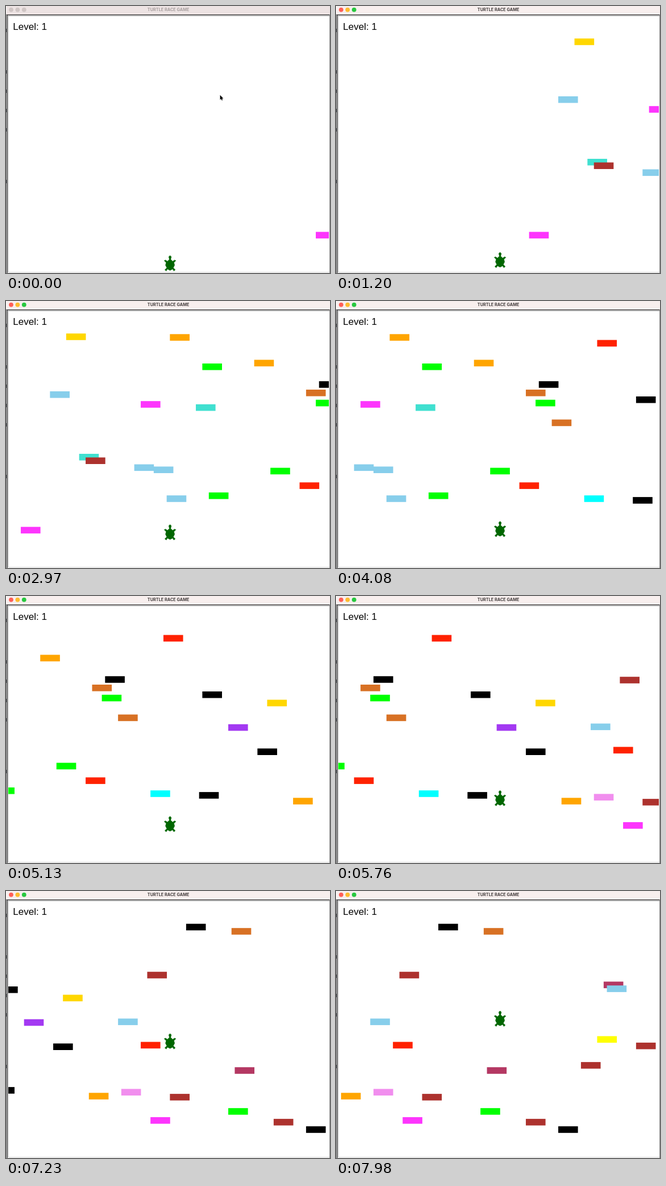
Write an HTML page with a canvas that moves like this. It is 570 px wide and 470 px high and loops after 8000 ms.

```html
<!DOCTYPE html>
<html lang="en">
<head>
<meta charset="utf-8">
<title>Turtle Race Game</title>
<style>
html, body { margin: 0; width: 100%; height: 100%; overflow: hidden; background: #fff; }
canvas { display: block; }
</style>
</head>
<body>
<canvas id="stage" width="570" height="470"></canvas>
<script>
const ctx = document.getElementById('stage').getContext('2d');
const LOOP = 8000, TICK = 30;
const STEP = 5.703;          // ten game units in pixels
const ACTIVE_AT = 420;       // window gains focus
const CURSOR_GONE = 1190;

const COLORS = {
  m: '#fd35fd', s: '#87ceeb', g: '#ffd700', t: '#40e0d0', b: '#ad322e',
  o: '#ffa500', l: '#00ff00', r: '#ff2200', c: '#d87124', k: '#000',
  p: '#a339f2', a: '#00ffff', v: '#f18eee', n: '#b43863', y: '#ffff00'
};

// [colour, game step at which the left edge is at x = 545, top]
const CARS = [
  ['m', 0, 397.6], ['s', 9, 159], ['g', 14, 57.2], ['t', 18, 269], ['b', 20, 275.4],
  ['s', 35, 287.5], ['m', 37, 176.2], ['s', 41, 291.4], ['s', 45, 342.2], ['o', 46, 58.3],
  ['t', 54, 181.8], ['l', 56, 110], ['l', 58, 337], ['o', 72, 103.5], ['l', 77, 293.6],
  ['r', 86, 319.3], ['c', 88, 156], ['l', 91, 173.8], ['k', 92, 141.2], ['c', 96, 208.6],
  ['a', 106, 342.2], ['r', 110, 68.6], ['k', 121, 345.1], ['k', 122, 168], ['p', 130, 225.7],
  ['k', 139, 268.4], ['g', 142, 182.6], ['o', 150, 355.3], ['s', 159, 224.5], ['v', 160, 348.4],
  ['r', 166, 265.6], ['b', 168, 142.2], ['m', 169, 398.1], ['b', 175, 357.1], ['k', 180, 57.7],
  ['l', 193, 382.2], ['c', 194, 65.2], ['n', 195, 310.2], ['b', 207, 401.1], ['k', 217, 414.2],
  ['b', 224, 301.1], ['y', 229, 255.5], ['n', 231, 159.5], ['s', 232, 166.3], ['b', 241, 266.9]
];

// [ms, game steps done]
const PACE = [[0, 0], [2160, 66], [2970, 91], [4080, 125], [5130, 157], [6450, 197], [7980, 244]];

// key presses: [first ms, interval, count]
const KEYS = [[1190, 0, 1], [1655, 90, 7], [3660, 0, 1], [5190, 80, 16], [6480, 100, 15]];

// right half of the turtle, nose to tail
const SHELL = [
  [0, 16], [2, 14], [1, 10], [4, 7], [7, 9], [9, 8], [6, 5],
  [7, 1], [5, -3], [8, -6], [6, -8], [4, -5], [0, -7]
];
const TURTLE = SHELL.concat(SHELL.slice(1, -1).reverse().map(([x, y]) => [-x, y]));
const ARROW = [[0, 0], [0, 9], [2, 7.2], [3.4, 10.2], [4.9, 9.5], [3.6, 6.7], [6.2, 6.4]];

function gameStep(t) {
  const i = Math.max(1, PACE.findIndex(p => p[0] >= t));
  const [t0, s0] = PACE[i - 1], [t1, s1] = PACE[i];
  return Math.floor(s0 + (s1 - s0) * (t - t0) / (t1 - t0) + 1e-6);
}

function turtleSteps(t) {
  return KEYS.reduce((sum, [start, gap, count]) => {
    if (t < start) return sum;
    return sum + (gap ? Math.min(count, Math.floor((t - start) / gap) + 1) : count);
  }, 0);
}

function rect(color, x, y, w, h) {
  ctx.fillStyle = color;
  ctx.fillRect(x, y, w, h);
}

function poly(points, x, y, sx, sy, fill, stroke, width) {
  ctx.beginPath();
  points.forEach(([px, py]) => ctx.lineTo(x + px * sx, y + py * sy));
  ctx.closePath();
  ctx.lineWidth = width;
  ctx.strokeStyle = stroke;
  ctx.stroke();
  ctx.fillStyle = fill;
  ctx.fill();
}

function text(str, x, y, font, color, align) {
  ctx.font = font;
  ctx.fillStyle = color;
  ctx.textAlign = align;
  ctx.fillText(str, x, y);
}

function drawWindow(active) {
  rect('#fff', 0, 0, 570, 470);
  rect('#a9a9ab', 0, 14, 1.5, 456);
  [40, 113, 147, 181, 215, 306].forEach(y => rect('#35383f', 0, y, 1, 6));
  rect(active ? '#f8efee' : '#ede3e3', 1, 0, 569, 15);
  const dots = active ? ['#ff5f57', '#febc2e', '#28c840'] : Array(3).fill('#cfc5c4');
  dots.forEach((color, i) => {
    ctx.fillStyle = color;
    ctx.beginPath();
    ctx.arc(9 + i * 11.4, 6.6, 3.9, 0, Math.PI * 2);
    ctx.fill();
  });
  text('TURTLE RACE GAME', 285.6, 9.2, '700 7.3px Inter, sans-serif',
    active ? '#433d3d' : '#a79e9e', 'center');
  rect('#1c1c1c', 1.5, 15, 568.5, 1.2);
  rect('#1c1c1c', 1.5, 15, 1.2, 455);
  rect('#a0a0a0', 3.6, 17, 565.4, 0.8);
  rect('#a0a0a0', 3.6, 17, 0.8, 452);
  rect('#8a8a8a', 569, 15, 1, 455);
  rect('#d0d0d0', 4, 468.3, 565, 1);
}

function draw(time) {
  const t = Math.floor(time / TICK) * TICK;
  const step = gameStep(t);
  drawWindow(t >= ACTIVE_AT);
  text('Level: 1', 12.2, 42.4, '17.1px "Liberation Sans", Arial, sans-serif', '#000', 'left');

  poly(TURTLE, 288.6, 457.4 - turtleSteps(t) * STEP, 1.14, -1.14, '#006600', '#006600', 0.6);

  ctx.save();
  ctx.beginPath();
  ctx.rect(4, 18, 564, 450);
  ctx.clip();
  CARS.forEach(([color, start, y]) => {
    const x = 545 - (step - start) * STEP;
    if (x < 552 && x > -35) rect(COLORS[color], x, y, 34.6, 11.6);
  });
  ctx.restore();

  if (t < CURSOR_GONE) poly(ARROW, 376.6, 156.8, 0.92, 0.92, '#000', '#fff', 1.4);
}

let origin = null;
function frame(now) {
  if (origin === null) origin = now;
  draw((now - origin) % LOOP);
  requestAnimationFrame(frame);
}
draw(0);
requestAnimationFrame(frame);
</script>
</body>
</html>
```
